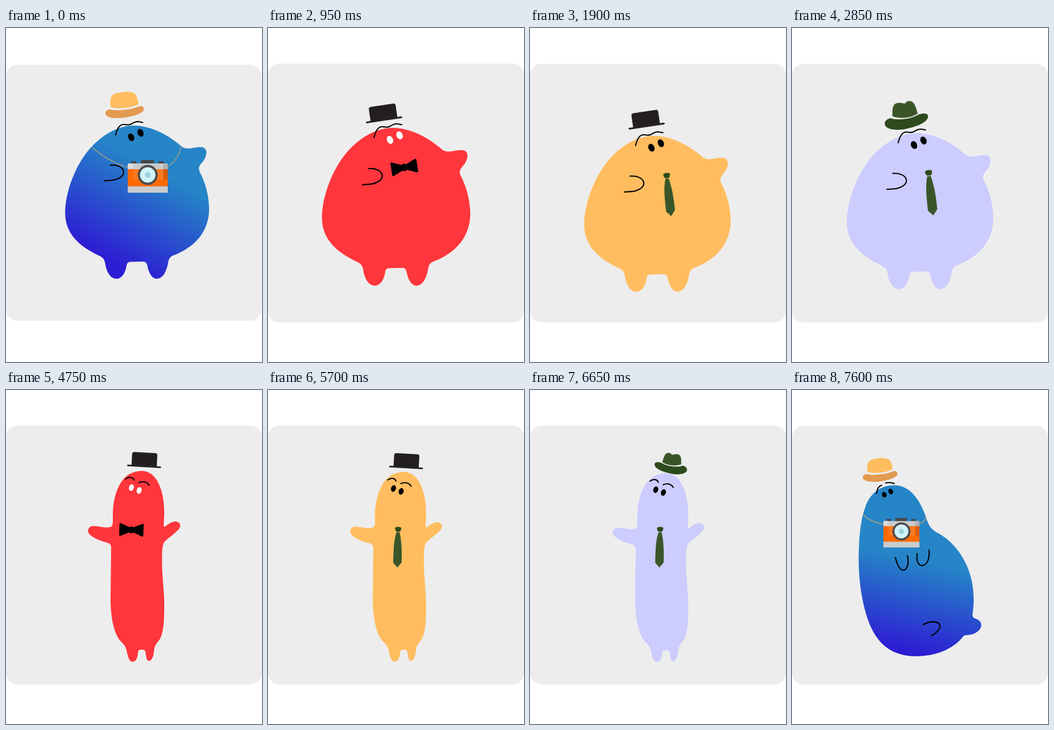
Animation of 448 by 582 pixels, one loop 8 s. Source, as an HTML page with a canvas:

```html
<!DOCTYPE html>
<html lang="en">
<head>
<meta charset="utf-8">
<title>Dressed-up blobs</title>
<style>
html, body { margin: 0; width: 100%; height: 100%; overflow: hidden; background: #fff; }
canvas { display: block; width: 448px; height: 582px; }
</style>
</head>
<body>
<canvas id="stage"></canvas>
<script>
const canvas = document.getElementById('stage');
const ctx = canvas.getContext('2d');
const dpr = window.devicePixelRatio || 1;
canvas.width = 448 * dpr;
canvas.height = 582 * dpr;

const LOOP = 8000, HOLD = 950;
const RED = '#ff363c', LILAC = '#ccccff', AMBER = '#ffbd5f';
const INK = '#231f20', CROWN = '#3a5629', BRIM = '#2d4b1c';

function fill(d, color) {
  ctx.fillStyle = color;
  ctx.fill(new Path2D(d));
}

function line(d, width = 2.1, color = '#000') {
  ctx.strokeStyle = color;
  ctx.lineWidth = width;
  ctx.lineCap = ctx.lineJoin = 'round';
  ctx.stroke(new Path2D(d));
}

function rect(x, y, w, h, color) {
  ctx.fillStyle = color;
  ctx.fillRect(x, y, w, h);
}

function oval(x, y, rx, ry, deg, color) {
  ctx.fillStyle = color;
  ctx.beginPath();
  ctx.ellipse(x, y, rx, ry, deg * Math.PI / 180, 0, Math.PI * 2);
  ctx.fill();
}

// Draws inside a moved, scaled, rotated and optionally mirrored space.
function place([x, y, scale = 1, deg = 0, flip = 1], draw) {
  ctx.save();
  ctx.translate(x, y);
  ctx.rotate(deg * Math.PI / 180);
  ctx.scale(scale * flip, scale);
  draw();
  ctx.restore();
}

const poses = {
  round: {
    body: `M221 174C258 176 288 197 306 213C318 219 328 211 342 213C353 216 349 230 344 237
      C336 246 334 249 337 257C347 276 354 300 354 325C353 365 328 393 287 408
      C279 413 281 421 278 429C274 442 268 449 259 449C250 448 245 437 243 427
      C242 421 240 418 235 418L212 418.5C207 419 206 421 205 426C203 439 196 449 187 449
      C177 449 170 439 167 424C166 415 163 411 157 408C120 391 95 368 94.5 332
      C94 295 113 241 145 209C167 187 194 173 221 174Z`,
    lines: `M165.5 273L176 272.4C190 271.5 200 265 200 258C200 250 190 244 176 245
      M185.5 191C188 180 193 172 200 172C206 172 206 174 212 172C218 169 222 164.500 234 168.500`,
    eyes: [[213.5, 195], [230.3, 187]], eyeSize: [5.3, 7.2, -25],
    shade: [155, 405, 245, 245]
  },
  slim: {
    body: `M238 141C265 141 277 178 277 213L276 235C276 239 278 239 281 236
      C286 232 292 229 297 229C305 230 308 237 301 244C291 254 283 258 277 265
      C273 270 273 285 273 300C273 325 277 350 277 376C277 400 276 425 268 436
      C261 444 260 447 259 455C258 465 255 472 250 472C246 472 245 464 244 456
      C243 453 241 452.500 237 452.500C232 452.500 231 454 231 459C230 468 227 473.500 221 473.500
      C215 473 213 463 211 454C210 448 207 444 201 438C188 424 183 393 183 364L184 277
      C184 270 183 268 177 266C164 263 149 256 145 250C141 243 146 237 153 237
      C163 237 173 241 181 239C187 238 187 234 187 224C186 200 191 174 204 157
      C213 146 225 141 238 141Z`,
    lines: 'M209.500 155C214 151 222 151 224 157M232.500 161.300C240 158 247 160 250.500 166',
    eyes: [[219.500, 170], [233, 175]], eyeSize: [4.3, 5.900, 18],
    shade: [195, 460, 245, 250]
  },
  seated: {
    body: `M178 166C208 165 225 195 234 220C239 238 245 243 253 248C285 264 318 305 318 365
      C318 375 317 384 316 390C315 397 320 398 325 400C336 406 332 420 317 425
      C309 428 303 426 300 429C281 453 250 464 215 464C180 463 154 448 138 413
      C122 377 115 325 117 278C118 248 121 222 129 202C137 180 155 166 178 166Z`,
    lines: `M181 292C184 304 188 314 195 314C202 313 205 302 202 289
      M219 285C217 298 221 306 228 306C236 305 241 295 240 279
      M229.500 409C241 402 256 402 259 410C260 417 252 424 244 428
      M148 180C149 172 152 167 157 166M164 162Q171 160 179 163`,
    eyes: [[161.500, 182.500], [172.800, 176.800]], eyeSize: [3.900, 5.100, -25],
    shade: [180, 450, 215, 295]
  }
};

function boater() {
  fill('M183 138C182 122 183 115 196 113C207 110 220 110 226 115C230 120 231 127 232 133C218 139 201 142 183 138Z', AMBER);
  fill('M176 144C180 141 183 142 187 143C204 144 220 142 232 137C238 134 242 138 241 143C238 150 215 157 194 157C178 157 170 151 176 144Z', '#e39a51');
}

function topHat() {
  fill('M-23 0V-20Q-23 -24 -19 -24H19Q23 -24 23 -20V0Z', INK);
  line('M-29.500 1H29.500', 3, INK);
}

function fedora() {
  fill('M176 154C175 142 176 133 183 131C190 129 194 132 198 131.500C201 126 209 126 213 131C217 137 218 143 220 149C208 157 191 159 176 154Z', CROWN);
  fill('M163 163C168 156 174 157 177 158.500C195 161 211 157 222 150.500C230 148 238 148 238 154C238 166 212 174 192 177C172 179 159 173 163 163Z', BRIM);
}

function bow() {
  const wings = 'M0 -1L-21 -10L-21 10L0 1ZM0 -1L21 -10L21 10L0 1Z';
  fill(wings, '#000');
  line(wings, 4);
  oval(0, 0, 6.500, 6.500, 0, '#000');
}

function tie() {
  fill('M-6 1C-3 -1 3 -1 6 1C6 5 5 8 3 9H-3C-5 8 -7 4 -6 1Z', BRIM);
  fill('M-3 10H3C7 25 9 45 9 69L1 79L-7.500 70C-8 45 -8 25 -3 10Z', CROWN);
}

function camera() {
  for (const [x, y, w] of [[219, 232, 9], [236, 230, 23], [267, 232, 9]]) rect(x, y, w, 7, '#46474d');
  rect(213, 236, 70, 51, '#cacbcd');
  rect(213, 236, 10, 9, '#dcdcde');
  rect(213, 246, 70, 30, '#ff6a00');
  rect(223, 246, 52, 18, '#fb7b22');
  rect(275, 236, 8, 10, '#b0b1b4');
  rect(275, 246, 8, 18, '#d65b0c');
  oval(248, 256, 17.500, 17.500, 0, '#4c4b4c');
  oval(248, 256, 13.500, 13.500, 0, '#d2f3f8');
  oval(248, 256, 5, 5, 0, '#9dd1db');
}

const straps = {
  round: 'M151 208C170 226 195 237 213 243M283 242C297 232 303 222 306 208',
  slim: 'M187 217C189 225 191 230 195 232M249 232C263 229 272 224 276 216',
  seated: 'M124 216C132 226 145 231 160 234M222 233C230 231 235 226 234 220'
};

const full = [0, 62, 448, 451];
// pose, body transform, colour (none: blue gradient), hat and neckwear with their placement
const scenes = [
  { pose: 'round', at: [11.750, 1.050, .971], panel: [0, 64, 447, 446],
    hat: [boater, [0, 0]], neck: [camera, [0, 0]] },
  { pose: 'round', at: [0, 0], color: RED, eye: '#fff', panel: full,
    hat: [topHat, [203, 159, 1.030, -8.400]], neck: [bow, [238.500, 243, 1, -9]] },
  { pose: 'round', at: [1.500, 16, .988], color: AMBER, panel: [0, 62.500, 448, 450.500],
    hat: [topHat, [204, 170, 1.030, -8.400]], neck: [tie, [239, 253, .950, -5.400]] },
  { pose: 'round', at: [2.600, 11.300, .988], color: LILAC, panel: [0, 62.500, 448, 450.500],
    hat: [fedora, [0, 0]], neck: [tie, [238.800, 248, 1, -5.400]] },
  { pose: 'slim', at: [0, 0], panel: [.500, 62.500, 446.500, 450.500],
    hat: [boater, [423, 13.700, .850, 0, -1]], neck: [camera, [28.600, 44.300, .780]] },
  { pose: 'slim', at: [0, 0], color: RED, eye: '#fff', panel: full,
    hat: [topHat, [241.700, 132, .960, 3.300]], neck: [bow, [219.500, 243.700, .920, 2]] },
  { pose: 'slim', at: [1.400, 2.700, .994], color: AMBER, panel: full,
    hat: [topHat, [241.700, 134, .960, 3.300]], neck: [tie, [228, 239, .890, 2]] },
  { pose: 'slim', at: [2.800, 5.400, .990], color: LILAC, panel: full,
    hat: [fedora, [396.500, 14, .750, 0, -1]], neck: [tie, [228, 239, .890, 2]] },
  { pose: 'seated', at: [0, 0], panel: [0, 63, 448, 450],
    hat: [boater, [-33.600, 18, .905]], neck: [camera, [-31.700, 16, .900]] }
];

function blue([x0, y0, x1, y1]) {
  const g = ctx.createLinearGradient(x0, y0, x1, y1);
  g.addColorStop(0, '#2d1dd3');
  g.addColorStop(1, '#2585c7');
  return g;
}

function drawScene({ pose, at, color, eye = '#000', panel, hat, neck }) {
  ctx.setTransform(dpr, 0, 0, dpr, 0, 0);
  rect(0, 0, 448, 582, '#fff');
  ctx.fillStyle = '#ededed';
  ctx.beginPath();
  ctx.roundRect(...panel, 20);
  ctx.fill();

  const p = poses[pose];
  place(at, () => {
    fill(p.body, color || blue(p.shade));
    line(p.lines);
    for (const [x, y] of p.eyes) oval(x, y, ...p.eyeSize, eye);
  });
  if (neck[0] === camera) line(straps[pose], 1.300, '#b9a57a');
  place(neck[1], neck[0]);
  place(hat[1], hat[0]);
}

const start = performance.now();
function frame(now) {
  const t = Math.max(0, now - start) % LOOP;
  drawScene(scenes[Math.floor(t / HOLD)]);
  requestAnimationFrame(frame);
}
drawScene(scenes[0]);
requestAnimationFrame(frame);
</script>
</body>
</html>
```
